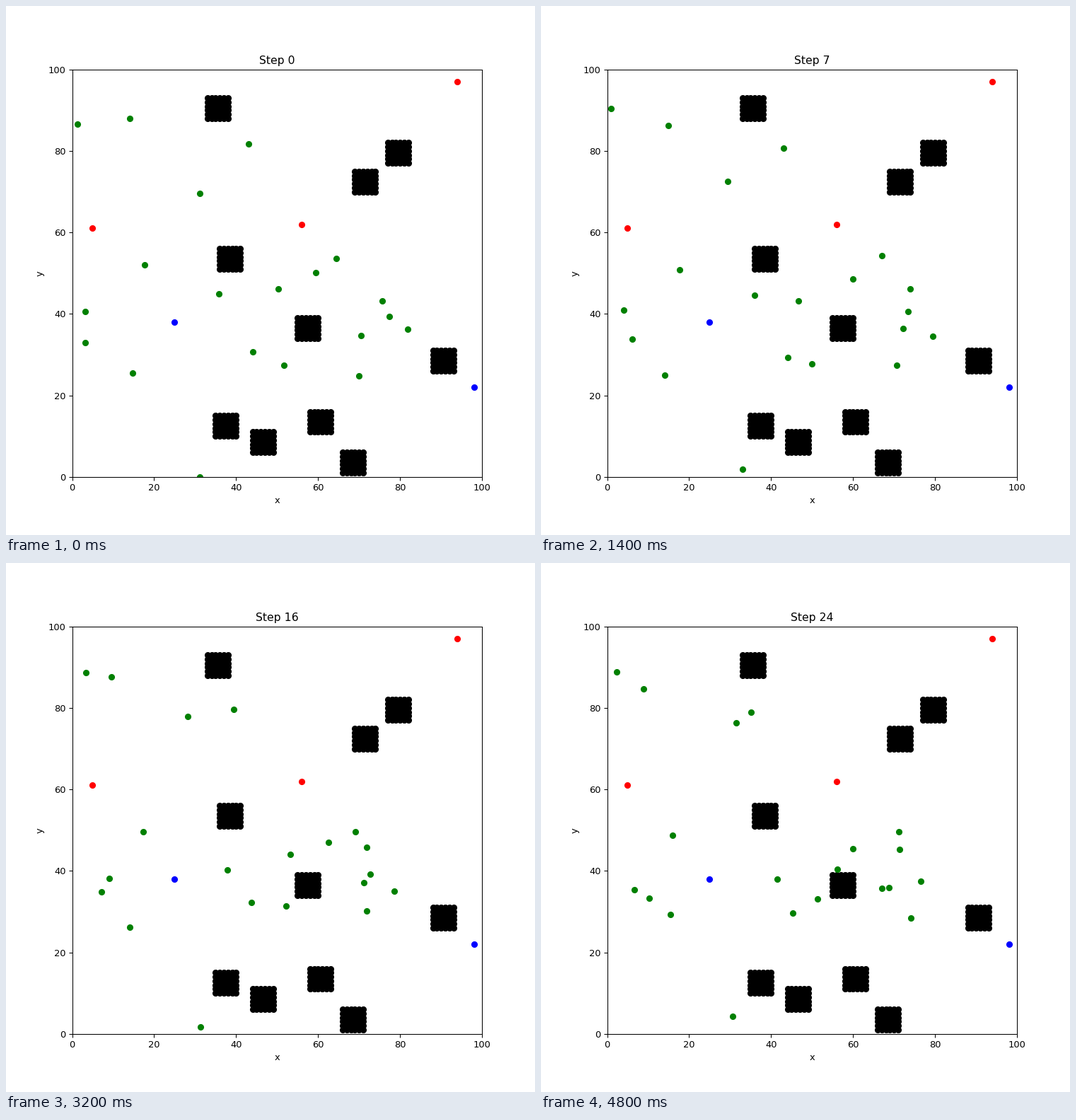
A matplotlib script for the animation above (5 s loop, 748x748 px).

```python
import matplotlib.pyplot as plt
import numpy as np
from matplotlib.animation import FuncAnimation

STAGE, INCHES = 748, 8
STEPS, INTERVAL = 25, 200
SIZE, BLOCK = 100, 6
STRIDE, REACH, PULL = 1.2, 18, 0.035

# Lower-left corners of the obstacles
BLOCKS = [(33, 88), (77, 77), (69, 70), (36, 51), (55, 34),
          (88, 26), (35, 10), (44, 6), (58, 11), (66, 1)]
RED = [(94, 97), (5, 61), (56, 62)]
BLUE = [(25, 38), (98, 22)]
WALKERS = [(1.3, 86.6), (14.1, 87.9), (43.1, 81.8), (31.1, 69.6), (17.6, 52),
           (35.8, 45), (50.2, 46.1), (59.5, 50.1), (64.4, 53.6), (3.2, 40.6),
           (3.2, 33), (14.7, 25.5), (44.1, 30.7), (51.6, 27.4), (70.5, 34.7),
           (70, 24.7), (75.7, 43.2), (77.3, 39.3), (81.8, 36.2), (31.1, 0)]


def in_block(points):
    """True for each point that touches an obstacle."""
    offset = points[:, None] - np.array(BLOCKS)
    return ((offset > -1) & (offset < BLOCK)).all(axis=2).any(axis=1)


def advance(points, rng):
    """Wander at random while drifting towards the centre of nearby walkers."""
    distance = np.linalg.norm(points[:, None] - points, axis=2)
    near = (distance < REACH).astype(float)
    centre = near @ points / near.sum(axis=1, keepdims=True)
    moved = points + PULL * (centre - points)
    moved += rng.uniform(-STRIDE, STRIDE, points.shape)
    moved = np.clip(moved, 0, SIZE)
    return np.where(in_block(moved)[:, None], points, moved)


def build_paths():
    rng = np.random.default_rng(7)
    paths = [np.array(WALKERS)]
    while len(paths) < STEPS:
        paths.append(advance(paths[-1], rng))
    return paths


def draw_dots(points, color):
    x, y = np.transpose(points)
    return ax.plot(x, y, "o", color=color)[0]


paths = build_paths()

fig, ax = plt.subplots(figsize=(INCHES, INCHES), dpi=STAGE / INCHES)
ax.set(xlim=(0, SIZE), ylim=(0, SIZE), xlabel="x", ylabel="y")
title = ax.set_title("Step 0")

draw_dots([(x + i, y + j) for x, y in BLOCKS
           for i in range(BLOCK) for j in range(BLOCK)], "black")
draw_dots(RED, "red")
draw_dots(BLUE, "blue")
walkers = draw_dots(paths[0], "green")


def update(step):
    walkers.set_data(*paths[step].T)
    title.set_text(f"Step {step}")
    return walkers, title


anim = FuncAnimation(fig, update, frames=STEPS, interval=INTERVAL,
                     repeat=True, repeat_delay=0)
plt.show()
```
